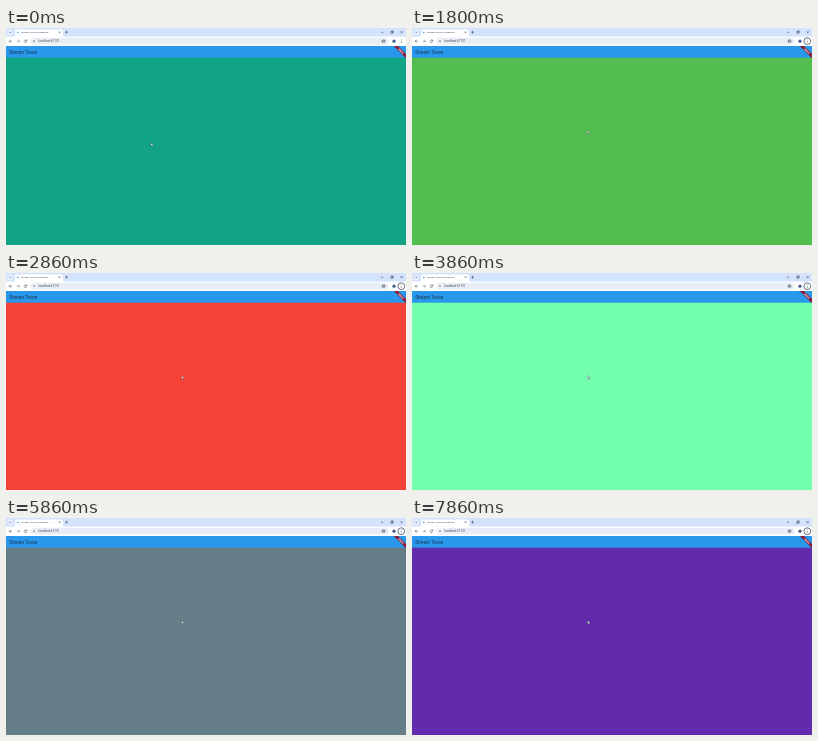
Recreate the animation shown at these times as an HTML page. Size 400 by 217 pixels, loop 8000 ms.

```html
<!DOCTYPE html>
<html lang="en">
<head>
<meta charset="utf-8">
<title>Colour stream</title>
<style>
  html, body { margin: 0; height: 100%; overflow: hidden; }
  svg { display: block; width: 100vw; height: 100vh; }
  text { font-family: Roboto, sans-serif; }
  .icon { fill: none; stroke: #3c4654; stroke-width: .55; }
</style>
</head>
<body>
<svg viewBox="0 0 400 217" preserveAspectRatio="none">
  <rect id="page" y="29" width="400" height="188"/>

  <!-- tab strip -->
  <rect width="400" height="10" fill="#d3e3fd"/>
  <rect x="1.5" y="1.6" width="5.4" height="5.4" rx="1.5" fill="#e4eefe"/>
  <path class="icon" d="M3.3 3.8l1 1 1-1"/>
  <path d="M7 9q2 0 2-2V3.2q0-1.7 1.7-1.7h44.6q1.7 0 1.7 1.7V7q0 2 2 2z" fill="#fff"/>
  <circle cx="11.8" cy="4.4" r=".9" fill="#69aee0"/>
  <text x="15" y="5.3" font-size="2.5" fill="#333b46">Stream Tovan Classwork</text>
  <path class="icon" d="M52.8 3.5l1.5 1.5m0-1.5l-1.5 1.5M59 4.2h3m-1.5-1.5v3"/>
  <path class="icon" d="M375 4.3h2.4M384.8 3.6h1.8v1.8h-1.8zM385.4 3.5v-.6h1.8v1.8h-.6M394.7 3.2l2 2m0-2l-2 2"/>

  <!-- toolbar -->
  <rect y="8.6" width="400" height="9.6" fill="#fff"/>
  <path class="icon" d="M6 13.2H3.2m1.2-1.2l-1.2 1.2 1.2 1.2"/>
  <path class="icon" d="M10.8 13.2h2.8m-1.2-1.2l1.2 1.2-1.2 1.2" stroke-opacity=".8"/>
  <path class="icon" d="M20.7 12.6a1.3 1.3 0 1 0 .1 1.2M20.9 11.6v1.2h-1.2"/>
  <rect x="24.5" y="9.8" width="358" height="6.8" rx="3.4" fill="#e9eef6"/>
  <circle cx="28" cy="13.2" r="1.9" fill="#fff"/>
  <circle cx="28" cy="13.2" r=".7" class="icon"/>
  <text x="32.5" y="14.2" font-size="2.9" fill="#39424e">localhost:61131</text>
  <path class="icon" d="M376.2 12h2.6v2.2h-2.6zM376.2 13.1h2.6"/>
  <circle cx="388" cy="13.2" r="1.6" fill="#405a88"/>
  <circle id="ring" cx="395.3" cy="13.2" r="3.4" fill="#fff" stroke="#26364f" stroke-width=".7"/>
  <path d="M395.3 11.6v3.4" stroke="#28313d" stroke-width=".65" stroke-dasharray=".65 .7"/>

  <!-- app bar and corner banner -->
  <rect y="18" width="400" height="11.7" fill="#2998ec"/>
  <text x="3.3" y="25.5" font-size="4.6" fill="#18314c">Stream Tovan</text>
  <svg x="386" y="18" width="14" height="14" viewBox="-14 0 14 14">
    <g transform="rotate(45)">
      <rect x="-9" y="5.7" width="18" height="2.9" fill="#8b1835"/>
      <text y="7.9" font-size="2.15" font-weight="900" text-anchor="middle" fill="#fff">DEBUG</text>
    </g>
  </svg>

  <path id="cursor" d="M0 0v3.3l.8-.7.6 1.2.6-.3-.6-1.1h1z" fill="#fff" stroke="#30343a" stroke-width=".35"/>
</svg>
<script>
  const LOOP = 8000;
  const FIRST_CHANGE = 860, INTERVAL = 1000;
  const colors = ['#10a385', '#52be50', '#f49806', '#f44336', '#72ffae',
                  '#795548', '#647d87', '#f8c40f', '#622aac'];
  // time, x, y
  const cursorStops = [[0, 145, 114.8], [1530, 155, 111], [1600, 169, 106], [1660, 175.7, 102.6]];

  const [page, ring, cursor] = ['page', 'ring', 'cursor'].map(id => document.getElementById(id));

  function draw(now) {
    const t = now % LOOP;
    const step = Math.floor((t - FIRST_CHANGE) / INTERVAL) + 1;
    page.setAttribute('fill', colors[step]);
    ring.setAttribute('visibility', t >= 530 ? 'visible' : 'hidden');
    const [, x, y] = cursorStops.filter(stop => stop[0] <= t).pop();
    cursor.setAttribute('transform', `translate(${x} ${y})`);
  }

  const start = performance.now();
  function tick() {
    draw(performance.now() - start);
    requestAnimationFrame(tick);
  }
  tick();
</script>
</body>
</html>
```
